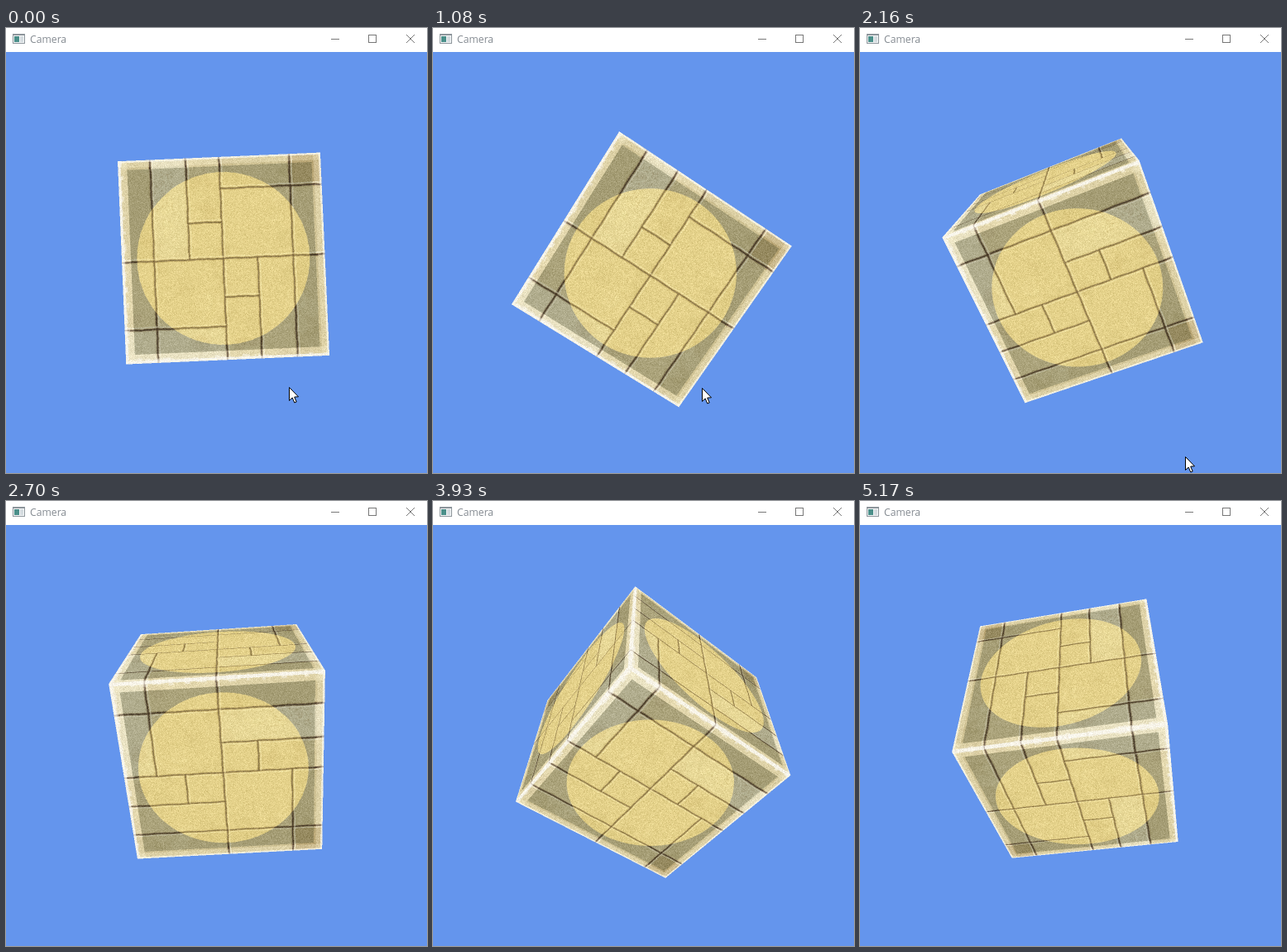
An HTML page with a canvas that plays this animation: 509 px wide and 538 px high, repeating every 5.27 s.

```html
<!DOCTYPE html>
<html lang="en">
<head>
<meta charset="utf-8">
<title>Camera</title>
<style>
  html, body { margin: 0; width: 100%; height: 100%; overflow: hidden; background: #6495ed; }
  canvas { display: block; }
</style>
</head>
<body>
<canvas id="stage" width="509" height="538"></canvas>
<script>
const W = 509, H = 538, LOOP = 5270, STEP = 89.1, LAST = 58;
const SKY = [100, 149, 237];
const FOCAL = 614, DIST = 3, CX = 262.8, CY = 279.4;
const AREA = { x: 84, y: 92, w: 360, h: 382 };
const SIZE = 512;
const ctx = document.getElementById('stage').getContext('2d');

let seed = 7;
function rand() {
  seed = (seed * 1664525 + 1013904223) % 4294967296;
  return seed / 4294967296;
}

// ---- stone texture, in u/v units from 0 to 1 ----
function makeTexture() {
  const c = document.createElement('canvas');
  c.width = c.height = SIZE;
  const g = c.getContext('2d', { willReadFrequently: true });
  g.scale(SIZE, SIZE);

  const rect = (fill, x0, y0, x1, y1) => {
    g.fillStyle = fill;
    g.fillRect(x0, y0, x1 - x0, y1 - y0);
  };
  const DARK = '#cfc294', MID = '#d8cb9e', LIGHT = '#dfd8b8';

  rect(MID, 0, 0, 1, 1);
  rect(LIGHT, 0.5, 0.16, 1, 0.335);
  rect(LIGHT, 0, 0, 0.165, 0.5);
  rect(DARK, 0.5, 0, 1, 0.16);
  rect(DARK, 0, 0.845, 0.845, 1);
  rect('#b8a574', 0.845, 0.845, 1, 1);
  rect(DARK, 0.845, 0.5, 1, 0.845);

  // soft stains
  for (let i = 0; i < 70; i++) {
    g.fillStyle = i % 3 ? 'rgba(120,95,45,0.06)' : 'rgba(255,250,225,0.10)';
    g.beginPath();
    g.ellipse(rand(), rand(), 0.01 + rand() * 0.06, 0.01 + rand() * 0.04, rand() * 3, 0, 7);
    g.fill();
  }
  for (let i = 0; i < 50; i++) {
    g.fillStyle = 'rgba(130,95,45,0.22)';
    g.fillRect(0.74 + rand() * 0.2, 0.17 + rand() * 0.09, 0.004 + rand() * 0.009, 0.006);
  }

  const seams = [
    [0, 0.16, 1, 0.16], [0.5, 0.335, 1, 0.335], [0, 0.5, 1, 0.5],
    [0, 0.67, 0.5, 0.67], [0, 0.845, 1, 0.845], [0.5, 0, 0.5, 1],
    [0.68, 0.335, 0.68, 0.5], [0.845, 0.5, 0.845, 1],
    [0.165, 0, 0.165, 0.5], [0.31, 0.5, 0.31, 0.67]
  ];
  const seam = ([x0, y0, x1, y1], color, width, shift) => {
    const n = Math.ceil(Math.hypot(x1 - x0, y1 - y0) * 24);
    const flat = y0 === y1;
    g.strokeStyle = color;
    g.lineWidth = width;
    g.beginPath();
    for (let i = 0; i <= n; i++) {
      const k = i / n, wob = Math.sin(i * 1.7 + x0 * 9 + y0 * 14) * 0.0014 + shift;
      g.lineTo(x0 + (x1 - x0) * k + (flat ? 0 : wob), y0 + (y1 - y0) * k + (flat ? wob : 0));
    }
    g.stroke();
  };
  g.lineJoin = 'round';
  for (const s of seams) {
    seam(s, 'rgba(255,250,225,0.7)', 0.007, 0.009);
    seam(s, 'rgba(125,98,60,0.4)', 0.016, -0.001);
    seam(s, 'rgba(58,42,32,0.8)', 0.007, -0.001);
  }

  // worn bright edges, partly covering the seam ends
  for (const [x, y, w, h] of [[0, 0, 0.046, 1], [0, 0, 1, 0.046], [0.965, 0, 0.035, 1], [0, 0.965, 1, 0.035]]) {
    rect('rgba(255,243,212,0.3)', x, y, x + w, y + h);
  }
  rect('rgba(255,252,242,0.85)', 0, 0, 0.013, 1);
  rect('rgba(255,252,242,0.85)', 0, 0, 1, 0.013);
  rect('rgba(255,252,242,0.75)', 0.991, 0, 1, 1);
  rect('rgba(255,252,242,0.75)', 0, 0.991, 1, 1);
  for (let i = 0; i < 70; i++) {
    const s = rand(), d = 0.012 + rand() * 0.014, l = 0.008 + rand() * 0.03;
    g.fillStyle = 'rgba(255,250,236,0.5)';
    if (i % 2) g.fillRect(s, 0, l, d); else g.fillRect(0, s, d, l);
  }

  // shaded inset with a plain yellow disc
  g.fillStyle = 'rgba(75,78,50,0.32)';
  g.beginPath();
  g.rect(0.045, 0.045, 0.91, 0.91);
  g.arc(0.5, 0.5, 0.425, 0, Math.PI * 2, true);
  g.fill('evenodd');
  g.fillStyle = 'rgba(238,215,122,0.55)';
  g.beginPath();
  g.arc(0.5, 0.5, 0.425, 0, Math.PI * 2);
  g.fill();
  for (const s of seams) seam(s, 'rgba(70,48,32,0.22)', 0.007, -0.001);

  // grain
  const img = g.getImageData(0, 0, SIZE, SIZE), d = img.data;
  for (let i = 0; i < d.length; i += 4) {
    const v = (rand() + rand() - 1) * 38;
    d[i] += v;
    d[i + 1] += v;
    d[i + 2] += v * 1.1;
  }
  return d;
}

const texture = makeTexture();
const view = ctx.createImageData(AREA.w, AREA.h);

// ---- cube: one ray per sample, four samples per pixel ----
function drawCube(step) {
  const rad = Math.PI / 180;
  const spin = (-92.5 + 2.96 * step) * rad, pitch = (-0.5 + 0.815 * step) * rad;
  const cs = Math.cos(spin), ss = Math.sin(spin), cp = Math.cos(pitch), sp = Math.sin(pitch);
  const oa = -DIST * ss * sp, ob = -DIST * cs * sp, oc = DIST * cp;
  const out = view.data;

  for (let py = 0, o = 0; py < AREA.h; py++) {
    for (let px = 0; px < AREA.w; px++, o += 4) {
      let r = 0, g = 0, b = 0;
      for (let k = 0; k < 4; k++) {
        const x = (AREA.x + px + 0.25 + (k & 1) * 0.5 - CX) / FOCAL;
        const y = (AREA.y + py + 0.25 + (k >> 1) * 0.5 - CY) / FOCAL;
        const depth = y * cp + sp;
        const da = cs * x + ss * depth, db = -ss * x + cs * depth, dc = y * sp - cp;
        // entry and exit distance for each pair of faces
        const ta = (-oa - 0.5 * Math.sign(da)) / da, ea = (-oa + 0.5 * Math.sign(da)) / da;
        const tb = (-ob - 0.5 * Math.sign(db)) / db, eb = (-ob + 0.5 * Math.sign(db)) / db;
        const tc = (-oc - 0.5 * Math.sign(dc)) / dc, ec = (-oc + 0.5 * Math.sign(dc)) / dc;
        const t = Math.max(ta, tb, tc);
        if (t > Math.min(ea, eb, ec)) {
          r += SKY[0]; g += SKY[1]; b += SKY[2];
          continue;
        }
        const back = 0.5 - (oc + dc * t);
        const u = t === ta ? back : oa + da * t + 0.5;
        const v = t === tb ? back : ob + db * t + 0.5;
        const tx = Math.max(0, Math.min(SIZE - 1, u * SIZE | 0));
        const ty = Math.max(0, Math.min(SIZE - 1, v * SIZE | 0));
        const i = (ty * SIZE + tx) * 4;
        r += texture[i]; g += texture[i + 1]; b += texture[i + 2];
      }
      out[o] = r / 4;
      out[o + 1] = g / 4;
      out[o + 2] = b / 4;
      out[o + 3] = 255;
    }
  }
  ctx.putImageData(view, AREA.x, AREA.y);
}

// ---- window frame ----
function line(...p) {
  ctx.beginPath();
  for (let i = 0; i < p.length; i += 2) ctx.lineTo(p[i], p[i + 1]);
  ctx.stroke();
}

function drawTitleBar() {
  ctx.fillStyle = '#fff';
  ctx.fillRect(0, 0, W, 29);

  ctx.fillStyle = '#8d959b';
  ctx.fillRect(8, 7, 15, 12);
  ctx.fillStyle = '#f4f6f7';
  ctx.fillRect(9, 9, 13, 9);
  ctx.fillStyle = '#4b8f8a';
  ctx.fillRect(10, 10, 6, 7);
  ctx.fillStyle = '#d5dce0';
  ctx.fillRect(17, 10, 4, 7);

  ctx.fillStyle = '#858b92';
  ctx.font = '12.2px "Open Sans", "Noto Sans", sans-serif';
  ctx.fillText('Camera', 29, 18);

  ctx.strokeStyle = '#777';
  ctx.lineWidth = 1;
  line(393, 13.5, 403, 13.5);
  ctx.strokeRect(438.5, 8.5, 9, 9);
  line(484, 8, 494, 18);
  line(494, 8, 484, 18);
}

// ---- pointer: step, x, y ----
const track = [[0, 342, 434], [12, 325, 435], [18, 333, 441], [24, 393, 518], [26, 432, 542], [LAST, 432, 560]];

function drawPointer(step) {
  const i = Math.max(1, track.findIndex(p => p[0] >= step));
  const [n0, x0, y0] = track[i - 1], [n1, x1, y1] = track[i];
  const k = (step - n0) / (n1 - n0);
  const x = Math.round(x0 + (x1 - x0) * k) + 0.5, y = Math.round(y0 + (y1 - y0) * k) + 0.5;
  ctx.beginPath();
  for (const [dx, dy] of [[0, 0], [0, 16], [3.7, 12.5], [6.3, 18.5], [8.7, 17.5], [6.2, 11.6], [11, 11.3]]) {
    ctx.lineTo(x + dx, y + dy);
  }
  ctx.closePath();
  ctx.fillStyle = '#fff';
  ctx.fill();
  ctx.strokeStyle = '#000';
  ctx.lineWidth = 1;
  ctx.stroke();
}

let shown = -1;
function render(now) {
  const step = Math.min(LAST, Math.floor((now % LOOP) / STEP));
  if (step !== shown) {
    shown = step;
    ctx.fillStyle = `rgb(${SKY})`;
    ctx.fillRect(0, 0, W, H);
    drawTitleBar();
    drawCube(step);
    drawPointer(step);
  }
}

const start = performance.now();
function tick() {
  render(performance.now() - start);
  requestAnimationFrame(tick);
}
tick();
</script>
</body>
</html>
```
